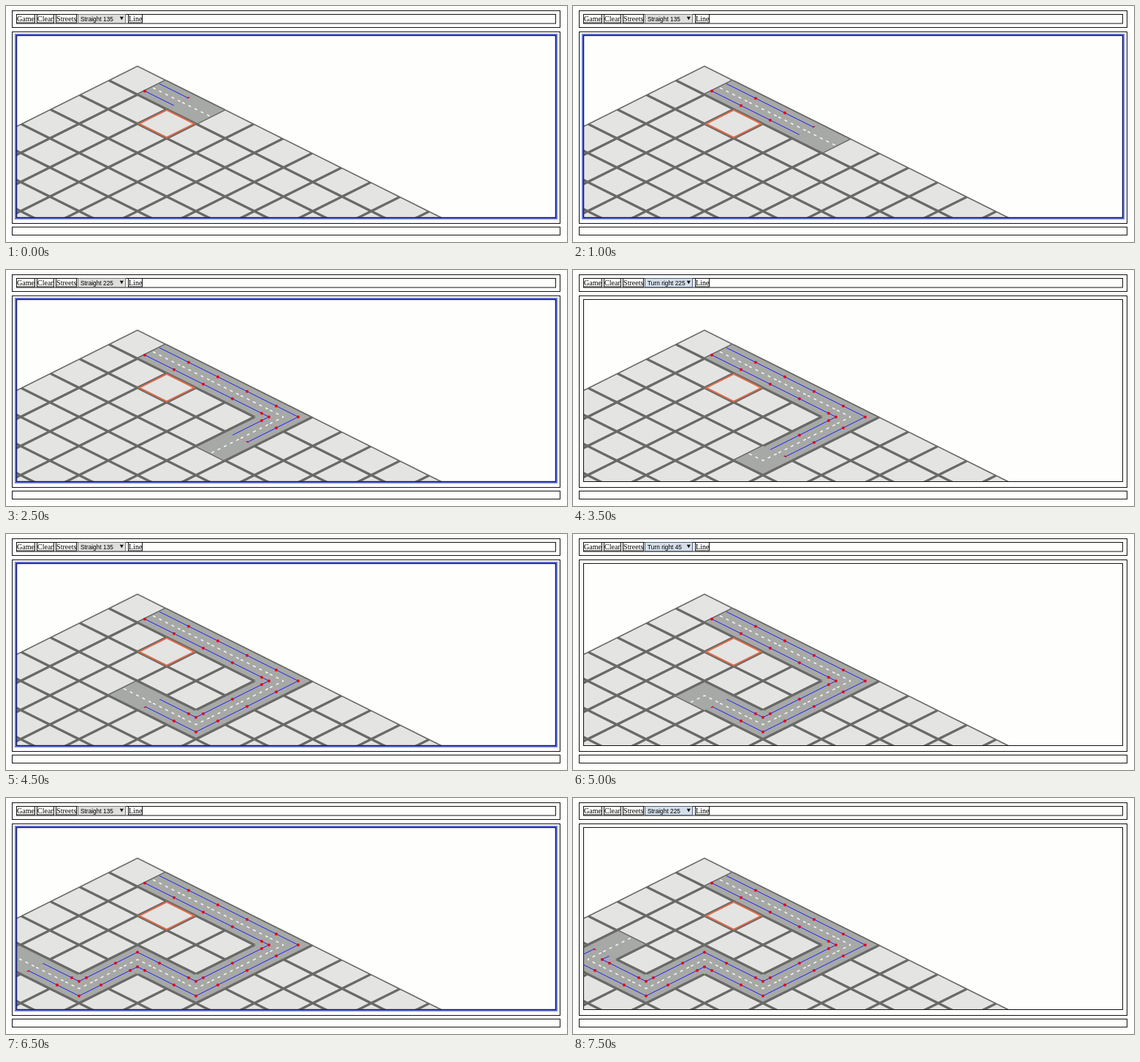
These frames come from a looping animation (768 px wide and 324 px high, 8000 ms). An HTML page:

```html
<!DOCTYPE html>
<html lang="en">
<head>
<meta charset="utf-8">
<title>Street editor</title>
<style>
  html, body { margin: 0; width: 100%; height: 100%; overflow: hidden; background: #fefffd; }
  svg { display: block; width: 768px; height: 324px; }
  .frame { fill: none; stroke: #111; }
  .label { font: 10px "Liberation Serif", serif; }
  .option { font: 8.33px "Liberation Sans", sans-serif; }
  .lane { fill: none; stroke: #2020f0; stroke-width: 1; }
  .dash { fill: none; stroke: #f6f6f6; stroke-width: 1.6; stroke-dasharray: 4 5.5; stroke-dashoffset: -1.35; }
</style>
</head>
<body>
<svg viewBox="0 0 768 324">
  <defs><clipPath id="view"><rect x="15" y="41" width="737" height="249"/></clipPath></defs>
  <g id="panels"></g>
  <g id="menu"></g>
  <g id="select">
    <rect id="selectBox" x="98.5" y="11.5" width="65" height="12"/>
    <text id="tool" class="option" x="102" y="20.5"></text>
    <path d="M155.8 14.8h5l-2.5 4.4z"/>
  </g>
  <g clip-path="url(#view)">
    <g id="ground"></g>
    <g id="roads"></g>
  </g>
  <rect class="frame" x="14.5" y="40.5" width="738" height="250"/>
  <g id="focus" fill="none">
    <rect x="13" y="39" width="741" height="253" stroke="#6d7fe0" stroke-width="2"/>
    <rect x="14.5" y="40.5" width="738" height="250" stroke="#0c1468" stroke-width="1.4"/>
  </g>
</svg>
<script>
const byId = id => document.getElementById(id);

// Edge directions on the grid: the first axis runs south-east, the second south-west.
const NW = [-1, 0], SE = [1, 0], NE = [0, -1], SW = [0, 1];

const tools = {
  S135: ['Straight 135', NW, SE],
  S225: ['Straight 225', NE, SW],
  T45: ['Turn right 45', SW, SE],
  T135: ['Turn right 135', NW, SW],
  T225: ['Turn right 225', NE, NW],
  T315: ['Turn right 315', SE, NE]
};

const route = [
  [1, 0, 'S135'], [2, 0, 'S135'], [3, 0, 'S135'], [4, 0, 'S135'], [5, 0, 'T135'],
  [5, 1, 'S225'], [5, 2, 'S225'], [5, 3, 'T225'], [4, 3, 'S135'], [3, 3, 'T45'],
  [3, 4, 'S225'], [3, 5, 'T225'], [2, 5, 'S135'], [1, 5, 'T315'], [1, 4, 'S225']
];

// Tiles placed, selected tool, canvas has focus.
const steps = [
  [1, 'S135', true], [2, 'S135', true], [3, 'S135', true], [4, 'T135', false],
  [5, 'S225', false], [6, 'S225', true], [7, 'S225', true], [7, 'T225', false],
  [8, 'S135', false], [9, 'S135', true], [9, 'T45', false], [10, 'S225', false],
  [11, 'T225', false], [13, 'S135', true], [14, 'T315', true], [14, 'S225', false]
];
const STEP_MS = 500;
const INSET = 0.047;

const project = ([u, v]) => [180 + 40 * (u - v), 81.7 + 20 * (u + v)];
const points = list => list.map(p => project(p).map(n => n.toFixed(2)).join()).join(' ');
const polygon = (list, style) => `<polygon points="${points(list)}" ${style}/>`;
const polyline = (list, name) => `<polyline points="${points(list)}" class="${name}"/>`;
const box = (u0, v0, u1, v1) => [[u0, v0], [u1, v0], [u1, v1], [u0, v1]];
const inner = (i, j, e) => box(i + e, j + e, i + 1 - e, j + 1 - e);
const right = ([u, v]) => [-v, u];
const add = (p, q, k = 1) => [p[0] + q[0] * k, p[1] + q[1] * k];

function surface(i, j, tool) {
  const [, a, b] = tools[tool];
  const inset = edge => edge === a || edge === b ? -0.006 : INSET;
  const center = [i + 0.5, j + 0.5];
  return polygon(box(i, j, i + 1, j + 1), 'fill="#696967"') +
    polygon(box(i + inset(NW), j + inset(NE), i + 1 - inset(SE), j + 1 - inset(SW)), 'fill="#a7a9a7"') +
    [a, b].map(edge => polyline([add(center, edge, 0.5), center], 'dash')).join('');
}

function lanePoints(i, j, from, to) {
  const center = [i + 0.5, j + 0.5];
  const heading = add([0, 0], from, -1);
  const straight = heading[0] === to[0] && heading[1] === to[1];
  const start = add(add(center, from, 0.5), right(heading), 0.25);
  const end = add(add(center, to, 0.5), right(to), 0.25);
  const bend = add(center, add(right(heading), right(to)), 0.25);
  return straight ? [start, end] : [start, bend, end];
}

function dot(p) {
  const [x, y] = project(p);
  return `<circle cx="${x}" cy="${y}" r="2" fill="#e4001c"/>`;
}

function drawPanels() {
  const frame = (x, y, w, h) => `<rect class="frame" x="${x}" y="${y}" width="${w}" height="${h}"/>`;
  byId('panels').innerHTML = frame(8.5, 6.5, 750, 23) + frame(14.5, 11.5, 738, 12.5) +
    frame(8.5, 35.5, 750, 263) + frame(8.5, 303.5, 750, 11);
  byId('menu').innerHTML = [['Game', 14.5, 25], ['Clear', 42.5, 23], ['Streets', 68.5, 28], ['Line', 167.5, 19]]
    .map(([text, x, w]) => frame(x, 11.5, w, 11.5) + `<text class="label" x="${x + 0.6}" y="20.5">${text}</text>`)
    .join('');
}

function drawGround() {
  const size = 12;
  let out = polygon(box(0, 0, size, size), 'fill="#696967"');
  for (let i = 0; i < size; i++)
    for (let j = 0; j < size; j++)
      out += polygon(inner(i, j, INSET), 'fill="#e4e4e3"');
  byId('ground').innerHTML = out;
}

function drawStep([placed, tool, focused]) {
  const done = route.slice(0, placed);
  const [nextI, nextJ] = route[placed];
  const lanes = done.flatMap(([i, j, type]) => {
    const [, a, b] = tools[type];
    return [lanePoints(i, j, a, b), lanePoints(i, j, b, a)];
  });
  byId('roads').innerHTML = done.map(tile => surface(...tile)).join('') +
    lanes.map(lane => polyline(lane, 'lane')).join('') +
    lanes.flatMap(lane => lane.slice(0, -1)).map(dot).join('') +
    surface(nextI, nextJ, tool) +
    polygon(inner(2, 1, 0.03), 'fill="#e4e4e3" stroke="#dc6a48" stroke-width="2"');
  byId('tool').textContent = tools[tool][0];
  byId('selectBox').setAttribute('fill', focused ? '#dededd' : '#d5dfe9');
  byId('selectBox').setAttribute('stroke', focused ? '#777' : '#4c5f7c');
  byId('focus').style.display = focused ? '' : 'none';
}

let shown = -1;
const begin = performance.now();
function tick() {
  const step = Math.floor((performance.now() - begin) / STEP_MS) % steps.length;
  if (step !== shown) drawStep(steps[shown = step]);
  requestAnimationFrame(tick);
}

drawPanels();
drawGround();
tick();
</script>
</body>
</html>
```
